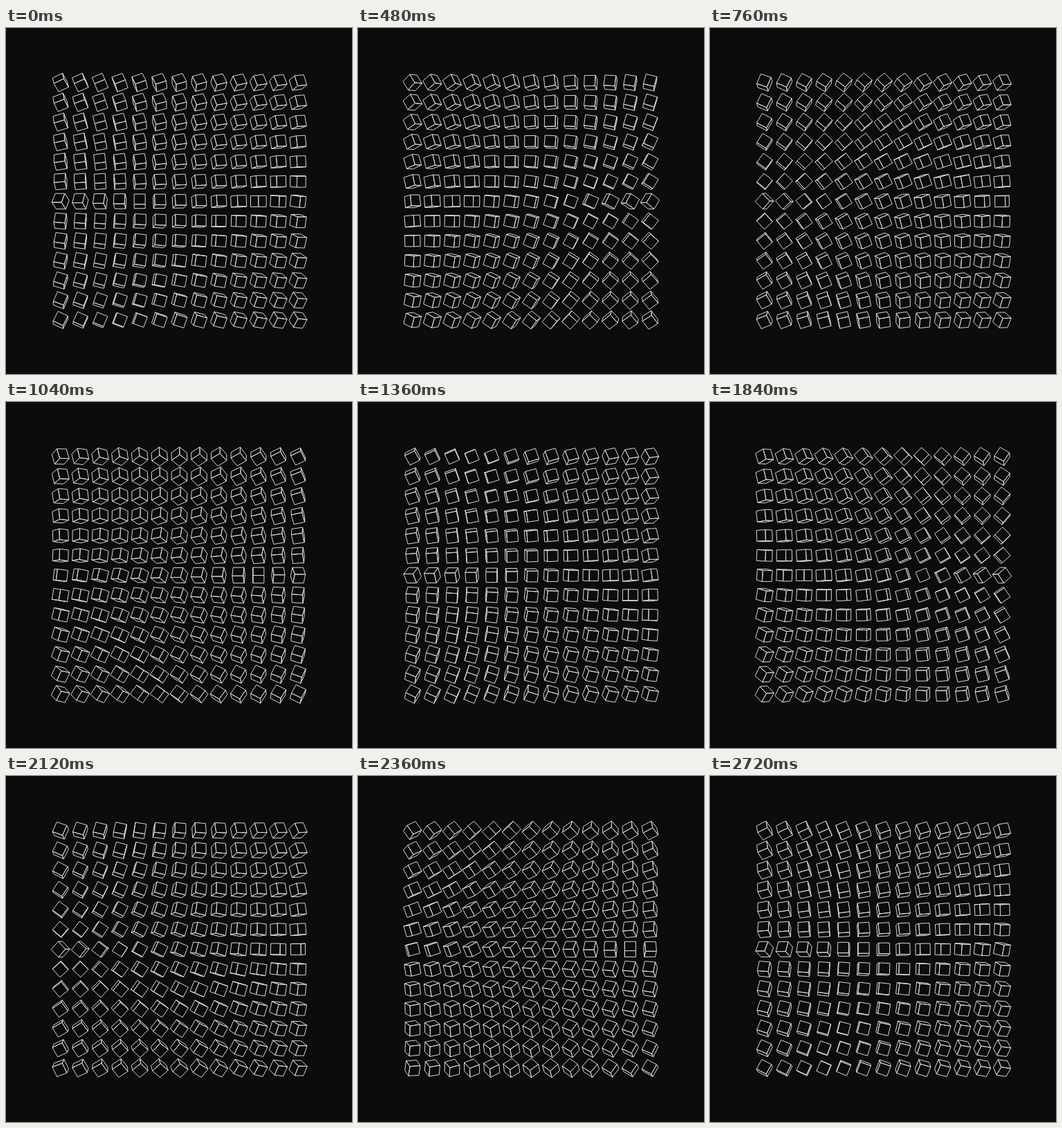
Animation, 500 px wide and 500 px high, one loop 2.76 s. Source, as an HTML page with a canvas:

```html
<!DOCTYPE html>
<html lang="en">
<head>
<meta charset="utf-8">
<title>Turning cubes</title>
<style>
html, body { margin: 0; width: 100%; height: 100%; overflow: hidden; background: #0c0c0c; }
canvas { display: block; width: 500px; height: 500px; }
</style>
</head>
<body>
<canvas id="stage" width="500" height="500"></canvas>
<script>
const LOOP = 2760, FRAME = 40;
const REACH = 6, STEP = 28.6, HALF = 8, MID = 250.4;
const TAU = Math.PI * 2;
const LAG = Math.PI / 48;   // turn per grid step
const START = TAU / 24;     // phase at time zero
const ctx = document.getElementById('stage').getContext('2d');

const X = 0, Y = 1, Z = 2;

// Turns a vector about one axis.
function turn(v, axis, angle) {
  const i = (axis + 1) % 3, j = (axis + 2) % 3;
  const c = Math.cos(angle), s = Math.sin(angle), out = v.slice();
  out[i] = v[i] * c - v[j] * s;
  out[j] = v[i] * s + v[j] * c;
  return out;
}

// Edge directions of the cube at grid place (x, y): columns set the phase
// of two full spins, rows lean the result.
function pose(x, y, phase) {
  const sway = (y === 0 ? 2 : 1) * LAG * x;   // the middle row fans out twice as far
  const turns = [
    [X, phase - LAG * x],
    [Y, phase + sway],
    [X, -LAG * y],
    [Z, LAG * y]
  ];
  return [[1, 0, 0], [0, 1, 0], [0, 0, 1]].map(e =>
    turns.reduce((v, [axis, angle]) => turn(v, axis, angle), e));
}

// Outlines the faces that look at the viewer.
function cube(axes, cx, cy) {
  ctx.beginPath();
  axes.forEach((n, i) => {
    if (Math.abs(n[Z]) < 0.002) return;
    const s = Math.sign(n[Z]), a = axes[(i + 1) % 3], b = axes[(i + 2) % 3];
    [[-1, -1], [1, -1], [1, 1], [-1, 1]].forEach(([u, v], k) => {
      const at = d => HALF * (s * n[d] + u * a[d] + v * b[d]);
      ctx[k ? 'lineTo' : 'moveTo'](cx + at(X), cy + at(Y));
    });
    ctx.closePath();
  });
  ctx.stroke();
}

function draw(now) {
  const t = Math.floor(now % LOOP / FRAME) * FRAME;
  const phase = START + TAU * t / LOOP;
  ctx.fillStyle = '#0c0c0c';
  ctx.fillRect(0, 0, 500, 500);
  ctx.strokeStyle = '#d8d8d8';
  ctx.lineWidth = 1;
  ctx.lineJoin = 'round';
  for (let y = -REACH; y <= REACH; y++)
    for (let x = -REACH; x <= REACH; x++)
      cube(pose(x, y, phase), MID + x * STEP, MID + y * STEP);
}

const start = performance.now();
function tick() {
  draw(performance.now() - start);
  requestAnimationFrame(tick);
}
tick();
</script>
</body>
</html>
```
